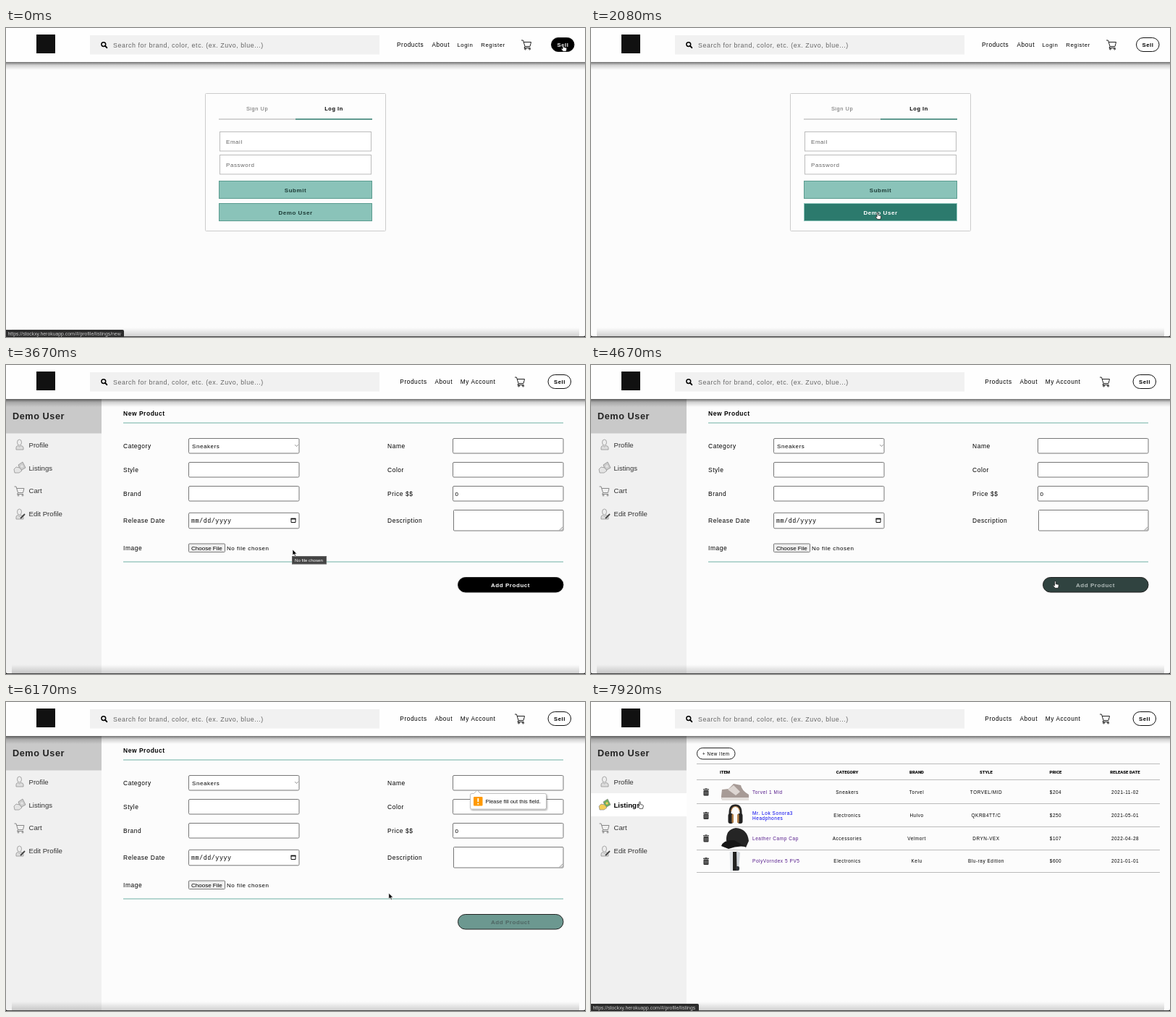
Recreate the animation shown at these times as an HTML page. Size 800 px wide and 427 px high, loop 8 s.

```html
<!DOCTYPE html>
<html lang="en">
<head>
<meta charset="utf-8">
<title>Shop demo</title>
<style>
html, body { margin: 0; width: 100%; height: 100%; overflow: hidden; background: #fcfcfc; }
svg { display: block; width: 100vw; height: 100vh; }
text { font-family: "Liberation Sans", Arial, sans-serif; letter-spacing: .556px; white-space: pre; }
.tight { letter-spacing: 0; }
.mid { text-anchor: middle; }
.b { font-weight: 700; }
.head { font: 900 6px Roboto, sans-serif; letter-spacing: 0; }
.mono { font-family: "Liberation Mono", monospace; }
.line { fill: none; stroke: #777; }
.icon { fill: none; stroke: #777; stroke-width: .8; stroke-linejoin: round; stroke-linecap: round; }
</style>
</head>
<body>
<svg id="stage" viewBox="0 0 800 427" preserveAspectRatio="none"></svg>
<script>
const text = (x, y, str, size, fill = '#000', cls = '', id = '') =>
  `<text x="${x}" y="${y}" font-size="${size}" fill="${fill}" class="${cls}" id="${id}">${str}</text>`;
const rect = (x, y, w, h, fill, stroke = 'none', r = 0, id = '') =>
  `<rect x="${x}" y="${y}" width="${w}" height="${h}" rx="${r}" fill="${fill}" stroke="${stroke}" id="${id}"/>`;
const path = (d, attrs = 'class="icon"') => `<path d="${d}" ${attrs}/>`;
const hline = (x1, x2, y, color, w = 1) => path(`M${x1} ${y}H${x2}`, `stroke="${color}" stroke-width="${w}"`);
const group = (id, body, at = '') => `<g id="${id}"${at && ` transform="translate(${at})"`}>${body}</g>`;

const cartIcon = path('M0 1H2.5L5 9.5H12L13.5 3.5H3.3M5 9.5L4 11.5H12.5');
const cart = (x, y, color) => `<g transform="translate(${x} ${y})" style="--c:${color}">${
  cartIcon.replace('class="icon"', `fill="none" stroke="${color}"`)
}<circle cx="5.5" cy="13" r="1" fill="none" stroke="${color}"/><circle cx="11.5" cy="13" r="1" fill="none" stroke="${color}"/></g>`;

const nav = (id, links, cartX, pillX) => group(id,
  links.map(([x, s, size]) => text(x, 26, s, size)).join('') + cart(cartX, 16, '#222') +
  rect(pillX, 13.5, 31.5, 19, '#fff', '#111', 9.5, id + 'Pill') +
  text(pillX + 16, 25.8, 'Sell', 7.78, '#000', 'b mid', id + 'Sell'));

const header = rect(0, 47, 800, 11, 'url(#drop)') + rect(0, 0, 800, 47, '#fefefe') +
  rect(42, 9, 26, 26, '#111') + rect(116, 10, 400, 26.5, '#f1f1f1') +
  path('M137.2 25L139.3 27.2', 'stroke="#000" stroke-width="1.9" stroke-linecap="round"') +
  '<circle cx="134.8" cy="22.6" r="2.9" fill="none" stroke="#000" stroke-width="1.5"/>' +
  text(148, 26.5, 'Search for brand, color, etc. (ex. Zuvo, blue...)', 8.89, '#666') +
  nav('guest', [[540, 'Products', 8.33], [588.5, 'About', 8.33], [623.5, 'Login', 7.78], [656.3, 'Register', 7.78]], 712, 753.5) +
  nav('member', [[544.3, 'Products', 8.33], [592.5, 'About', 8.33], [627.8, 'My Account', 8.33]], 703, 749);

const loginButton = (y, s, id) => rect(294.5, y, 211, 24, '#8ac3b9', '#5b9c90', 0, id + 'Box') +
  text(400, y + 15, s, 8, '#1c3a35', 'b mid', id + 'Text');
const login = group('login',
  rect(275.5, 90.5, 249, 190, '#fdfdfd', '#ccc', 1) +
  text(347, 114, 'Sign Up', 7.41, '#666', 'mid') + text(453, 114, 'Log In', 7.41, '#000', 'b mid') +
  hline(294, 400, 126, '#aaa') + hline(400, 506, 126, '#2c7a6d', 1.3) +
  rect(295.5, 143.5, 209, 26.5, '#fff', '#bbb') + text(304, 159.5, 'Email', 8, '#666') +
  rect(295.5, 175.5, 209, 26.5, '#fff', '#bbb') + text(304, 191.5, 'Password', 8, '#666') +
  loginButton(211.5, 'Submit', 'submit') + loginButton(242.5, 'Demo User', 'demo'));

const person = path('M3 15V12Q3 10 5.5 9.5L7.5 11L9.5 9.5Q13 10 13 12V15Z', 'fill="#ddd" stroke="#888" stroke-width=".7"') +
  '<ellipse cx="7.5" cy="5" rx="3" ry="4" fill="#eee" stroke="#888" stroke-width=".7"/>';
const cash = (note, hand) => path('M6 4L12 0L16 8L9 12Z', `fill="${note}" stroke="#888" stroke-width=".7"`) +
  path('M0 10L3 7L8 8L11 12L7 15H1Z', `fill="${hand}" stroke="#888" stroke-width=".7"`) +
  `<circle cx="11" cy="6" r="1.7" fill="${hand}"/>`;
const sidebar = group('sidebar',
  rect(0, 47, 132, 380, '#f0f0f0') + rect(0, 47, 132, 47.5, '#c9c9c9') +
  text(9, 75, 'Demo User', 12.7, '#222', 'b') +
  group('rowHover', rect(0, 126, 132, 32, '#fff')) +
  group('', person, '11 102') +
  group('cashOff', cash('#ccc', '#e4e4e4'), '11 134') + group('cashOn', cash('#6fae5c', '#f3cf58'), '11 134') +
  cart(11.5, 167, '#888') + group('', person + path('M9 14L15 8', 'stroke="#444" stroke-width="1.8"'), '11 198') +
  text(31.5, 114, 'Profile', 9.6, '#333', 'tight') +
  text(31.5, 145.5, 'Listings', 9.6, '#333', 'tight', 'listLink') +
  text(31.5, 177.3, 'Cart', 9.6, '#333', 'tight') +
  text(31.5, 209, 'Edit Profile', 9.6, '#333', 'tight'));

const field = (x, y, label, h = 20.5) =>
  text(x, y + 13.5, label, 8.45) + rect(x + 90.5, y, 152.5, h, '#fff', '#777', 1.5);
const form = group('form',
  text(162, 70, 'New Product', 8.45, '#000', 'b') + hline(162, 770, 80, '#6fb0a4') +
  field(162, 101.5, 'Category') + text(257, 114.5, 'Sneakers', 8) + path('M399.5 110.5L401.5 112.5L403.5 110.5') +
  field(162, 134.5, 'Style') + field(162, 167.5, 'Brand') +
  field(162, 204.3, 'Release Date', 21.5) + text(256, 218, 'mm/dd/yyyy', 8.33, '#000', 'mono') +
  path('M394 212.5H400V217.5H394Z', 'fill="none" stroke="#111"') + hline(393.5, 400.5, 212.5, '#111', 1.8) +
  text(162, 255.5, 'Image', 8.45) + rect(252.5, 247, 50, 11.5, '#efefef', '#777', 1) +
  text(256, 255.5, 'Choose File', 8, '#000', 'tight') + text(305, 255.5, 'No file chosen', 8) +
  field(527, 101.5, 'Name') + field(527, 134.5, 'Color') +
  field(527, 167.5, 'Price $$') + text(620.5, 180.7, '0', 8) +
  text(527, 218, 'Description', 8.45) + rect(618.5, 200.5, 151.5, 28.5, '#fff', '#777', 1) +
  path('M765 228L769 224M767.5 228L769 226.5') +
  hline(162, 770, 272, '#6fb0a4') +
  rect(624.5, 293.5, 145.5, 20.5, '#000', '#222', 10.2, 'addBox') +
  text(697, 306.5, 'Add Product', 8, '#fff', 'b mid', 'addText') +
  group('tooltip', rect(395.5, 264.5, 47, 10.5, '#444', '#666') + text(399, 272, 'No file chosen', 6.15, '#fff', 'tight')) +
  group('bubble', '<g filter="url(#soft)">' +
    path('M643.5 126.5H646.5L651 122L655.5 126.5H744.5Q746.5 126.5 746.5 128.5V146Q746.5 148 744.5 148H643.5Q641.5 148 641.5 146V128.5Q641.5 126.5 643.5 126.5Z', 'fill="#fff" stroke="#aaa" stroke-width=".7"') +
    '</g>' + rect(646, 131, 12.5, 12.5, '#f90', 'none', 1) + hline(651.4, 653.2, 135.5, '#fff', 5) + hline(651.4, 653.2, 140.6, '#fff', 1.8) +
    text(662.5, 139.6, 'Please fill out this field.', 7.5, '#111', 'tight')));

const fill = (d, color) => path(d, `fill="${color}"`);
const photos = [
  fill('M180 130L181 121L190 120L197 113L207 115Q208 122 218 128V134H180Z', '#a79b96') +
    fill('M180 132H218V136H181Z', '#e3dfdc') + fill('M189 121L197 115L206 124L200 129Z', '#ddd6d2'),
  path('M192 159V153Q192 143 199.5 143T207 153V159', 'fill="none" stroke="#252525" stroke-width="3"') +
    path('M193.5 151Q195 144.5 199.5 144.5T205.5 151', 'fill="none" stroke="#c08a50" stroke-width="1.2"') +
    rect(189.5, 154, 7, 14, '#222', 'none', 3) + rect(202.5, 154, 7, 14, '#222', 'none', 3) +
    rect(194.5, 155, 2.5, 12, '#b58149', 'none', 1) + rect(202, 155, 2.5, 12, '#b58149', 'none', 1),
  fill('M187 192Q186 176 200 174Q216 175 218 192L214 201Q201 191 187 192Z', '#252525') +
    fill('M180 199Q183 190 198 191L214 200Q202 198 190 203Z', '#171717'),
  rect(194, 207, 8.5, 26, '#222') + fill('M191.5 207L196 206V233L192.5 234Z', '#e2e6ea') +
    fill('M201 206L206 208L204 233L201.5 231Z', '#cfd5db') + rect(200, 227, 5, 6, '#30343a', 'none', 2)
];
const rows = [
  [124.5, ['Torvel 1 Mid'], 'Sneakers', 'Torvel', 'TORVEL/MID', '$204', '2021-11-02'],
  [157, ['Mr. Lok Sonora3', 'Headphones'], 'Electronics', 'Hulvo', 'QKRB4TT/C', '$250', '2021-05-01'],
  [188.5, ['Leather Camp Cap'], 'Accessories', 'Velmort', 'DRYN-VEX', '$107', '2022-04-28'],
  [220, ['PolyVorndex 5 PV5'], 'Electronics', 'Kelu', 'Blu-ray Edition', '$600', '2021-01-01']
];
const column = i => 354 + 96 * i;
const trash = y => rect(155.5, y - 2.5, 7, 7.5, '#333', 'none', 1) + hline(155, 163, y - 3.7, '#333', 1.2) +
  hline(157.5, 160.5, y - 4.6, '#333', 1) + path(`M157.5 ${y - 1}v4.5M159.2 ${y - 1}v4.5M160.9 ${y - 1}v4.5`, 'stroke="#bbb" stroke-width=".5"');
const listing = group('listing',
  rect(146.5, 63.5, 52.5, 15.5, '#fff', '#222', 7.7) + text(154, 73.5, '+ New Item', 6.3) +
  [85.5, 107.5, 140.5, 172.5, 204.5, 235.5].map(y => hline(146, 786, y, '#bbb')).join('') +
  text(178, 99, 'ITEM', 6, '#000', 'head') +
  ['CATEGORY', 'BRAND', 'STYLE', 'PRICE', 'RELEASE DATE'].map((s, i) => text(column(i), 99, s, 6, '#000', 'head mid')).join('') +
  rows.map(([y, names, ...cells], r) => trash(y) + photos[r] +
    names.map((s, i) => text(223, y + 2.3 + (i - (names.length - 1) / 2) * 6.5, s, 6.5, r == 1 ? '#00e' : '#551a8b')).join('') +
    cells.map((s, i) => text(column(i), y + 2.3, s, 6.4, '#000', 'mid')).join('')).join(''));

const url = 'https://stockxy.herokuapp.com/#/profile/listings';
const status = (id, w, s) => group(id, rect(-2, 417, w + 2, 12, '#2c2c2c', 'none', 2) + text(2.5, 424.5, s, 6.89, '#ccc', 'tight'));

const stage = document.getElementById('stage');
stage.innerHTML = `<defs>
  <linearGradient id="drop" x2="0" y2="1"><stop stop-opacity=".55"/><stop offset=".4" stop-opacity=".17"/><stop offset="1" stop-opacity="0"/></linearGradient>
  <linearGradient id="foot" x2="0" y2="1"><stop stop-opacity="0"/><stop offset="1" stop-opacity=".17"/></linearGradient>
  <filter id="soft"><feDropShadow dx="1" dy="1.5" stdDeviation="1.2" flood-opacity=".35"/></filter>
</defs>` + rect(0, 0, 800, 427, '#fcfcfc') + login + sidebar + form + listing + header +
  rect(8, 414, 784, 12, 'url(#foot)') + rect(0, 426, 800, 1, '#444') +
  fill('M0 424Q0 427 3 427H0ZM800 424Q800 427 797 427H800Z', '#000') +
  status('statusNew', 163, url + '/new') + status('statusList', 149, url) +
  group('pointer',
    group('arrow', path('M0 0V8L1.9 6.3L3.2 9.2L4.5 8.6L3.2 5.9H5.8Z', 'fill="#000" stroke="#fff" stroke-width=".6"')) +
    group('hand', path('M-.9 .3Q0 -.8 .8 .3V3.6L4 4.3Q5 4.6 4.8 6L4 9.3H-.3L-3 5.9Q-2.8 4.7-.9 6Z', 'fill="#fff" stroke="#111" stroke-width=".7"')));

const el = {};
stage.querySelectorAll('[id]').forEach(e => el[e.id] = e);
const show = (id, on) => el[id].setAttribute('opacity', Number(on));
const paint = (id, color) => el[id].setAttribute('fill', color);
const mix = (a, b, p) => `rgb(${a.map((v, i) => Math.round(v + (b[i] - v) * p))})`;
const ramp = (t, start, len = 400) => Math.sin(Math.min(1, Math.max(0, (t - start) / len)) * Math.PI / 2);

const BLACK = [0, 0, 0], WHITE = [255, 255, 255], MINT = [138, 195, 185], TEAL = [44, 122, 109], INK = [28, 58, 53];

// Pointer stops: time, x, y
const stops = [
  [0, 770, 23], [83, 764, 29], [250, 728, 78], [500, 640, 165], [750, 538, 234], [833, 518, 243],
  [917, 455, 250], [1083, 396, 255], [3833, 396, 255], [4000, 432, 258], [4250, 555, 272], [4417, 614, 280],
  [4500, 630, 291], [4583, 641.5, 299], [6000, 641.5, 299], [6083, 628, 296], [6167, 528.5, 264],
  [6250, 475, 246], [6333, 440, 234], [6417, 425, 229], [6500, 425, 229], [6833, 243, 142],
  [6917, 243, 142], [7083, 150, 136], [7333, 67.5, 138], [8000, 67.5, 138]
];
function pointerAt(t) {
  const i = Math.max(1, stops.findIndex(s => s[0] >= t));
  const [a, b] = [stops[i - 1], stops[i]], p = (t - a[0]) / (b[0] - a[0]);
  return [a[1] + (b[1] - a[1]) * p, a[2] + (b[2] - a[2]) * p];
}

function draw(t) {
  const onLogin = t < 2240, onList = t >= 7490, onForm = !onLogin && !onList;
  show('login', onLogin); show('guest', onLogin);
  show('sidebar', !onLogin); show('member', !onLogin);
  show('form', onForm); show('listing', onList);

  const sell = 1 - ramp(t, 120);
  paint('guestPill', mix(WHITE, BLACK, sell));
  paint('guestSell', mix(BLACK, WHITE, sell));

  const demo = ramp(t, 980);
  paint('demoBox', mix(MINT, TEAL, demo));
  paint('demoText', mix(INK, WHITE, demo));
  el.demoBox.setAttribute('stroke', mix([91, 156, 144], MINT, demo));

  const add = ramp(t, 4577) - ramp(t, 6110);
  paint('addBox', mix(BLACK, MINT, add));
  paint('addText', mix(WHITE, INK, add));

  show('tooltip', t > 3660 && t < 3900);
  show('bubble', t > 5325);

  const row = t > 7150;
  show('rowHover', row); show('cashOn', row); show('cashOff', !row);
  el.listLink.setAttribute('font-weight', row ? 700 : 400);
  paint('listLink', row ? '#000' : '#333');
  show('statusNew', 1 - ramp(t, 920, 160));
  show('statusList', row);

  const [x, y] = pointerAt(t);
  const hand = t < 150 || t > 950 && onLogin || t > 4490 && t < 6110 || row;
  show('hand', hand); show('arrow', !hand);
  el.pointer.setAttribute('transform', `translate(${x} ${y})`);
}

const STEP = 1000 / 12;
function tick() {
  const t = performance.now() % 8000;
  draw(Math.floor((t + 4) / STEP) % 96 * STEP);
  requestAnimationFrame(tick);
}
tick();
</script>
</body>
</html>
```
